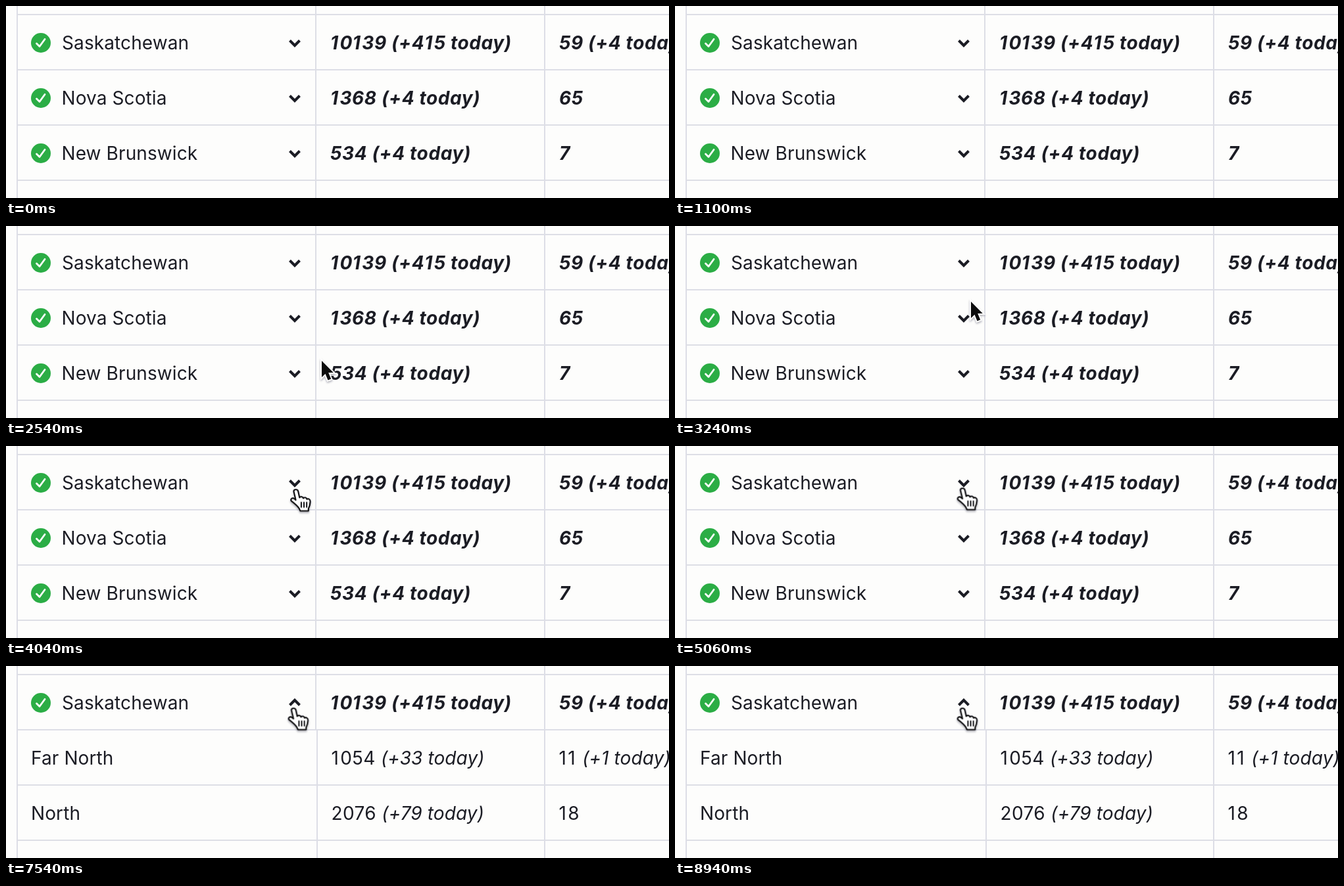
An HTML page that plays this animation: 1008 px wide and 292 px high, repeating every 9.88 s.

```html
<!DOCTYPE html>
<html lang="en">
<head>
<meta charset="utf-8">
<title>Expandable table rows</title>
<style>
  html, body { margin: 0; width: 100%; height: 100%; overflow: hidden; background: #fdfdfc; }
  svg { display: block; width: 1008px; height: 292px; }
  text { font: 400 28px Inter, "Liberation Sans", sans-serif; letter-spacing: .1px; fill: #1b1c24; }
  .total { font-weight: 700; font-style: italic; letter-spacing: .6px; }
  .count { letter-spacing: .4px; }
  .delta { font-style: italic; letter-spacing: .1px; }
  .one { letter-spacing: 2.3px; }
  .grid { fill: none; stroke: #dddee6; stroke-width: 2; }
  .chevron { fill: none; stroke: #1b1c24; stroke-width: 4.1; }

  .closed, .open, .arrow, .hand { animation: 9880ms step-end infinite; }
  .closed { animation-name: hide-closed; }
  .open { animation-name: show-open; }
  .arrow { animation-name: show-arrow; }
  .hand { animation-name: show-hand; }
  .pointer { animation: travel 9880ms linear infinite; }

  @keyframes hide-closed { 0% { opacity: 1; } 63.97%, 100% { opacity: 0; } }
  @keyframes show-open { 0% { opacity: 0; } 63.97%, 100% { opacity: 1; } }
  @keyframes show-arrow { 0% { opacity: 0; } 20.24% { opacity: 1; } 37.65%, 100% { opacity: 0; } }
  @keyframes show-hand { 0% { opacity: 0; } 37.65%, 100% { opacity: 1; } }
  @keyframes travel {
    0%, 20.24% { transform: translate(540px, 300px); }
    25.71%, 26.72% { transform: translate(480px, 205px); }
    31.17% { transform: translate(453px, 136px); }
    32.79%, 33.81% { transform: translate(450px, 115px); }
    37.65% { transform: translate(445px, 76px); }
    41.3% { transform: translate(440px, 67px); }
    47.98%, 100% { transform: translate(437px, 66px); }
  }
</style>
</head>
<body>
<svg viewBox="0 0 1008 292">
  <defs>
    <g id="check">
      <circle cx="53" cy="56" r="15" fill="#2bad45"/>
      <path d="M46.5 57 51 61.5 59 50.5" fill="none" stroke="#fff" stroke-width="2.8" stroke-linecap="round" stroke-linejoin="round"/>
    </g>
    <path id="down" class="chevron" d="M431.5 52.5 439 60 446.5 52.5"/>
    <filter id="shadow" x="-50%" y="-50%" width="200%" height="200%">
      <feDropShadow dx="0" dy="2" stdDeviation="1.5" flood-color="#222233" flood-opacity=".35"/>
    </filter>
  </defs>

  <path class="grid" d="M16 13H1008M16 97H1008M16 181H1008M16 265H1008M17 0V292M819 0V292M471 0V97"/>

  <use href="#check"/>
  <text x="85" y="66">Saskatchewan</text>
  <text class="total" x="493" y="66"><tspan class="one">1</tspan>0<tspan class="one">1</tspan>39 (+4<tspan class="one">1</tspan>5 today)</text>
  <text class="total" x="841" y="66">59 (+4 today)</text>

  <g class="closed">
    <path class="grid" d="M471 97V292"/>
    <use href="#down"/>
    <use href="#check" y="84"/>
    <use href="#down" y="84"/>
    <text x="84.5" y="150">Nova Scotia</text>
    <text class="total" x="493" y="150"><tspan class="one">1</tspan>368 (+4 today)</text>
    <text class="total" x="841" y="150">65</text>
    <use href="#check" y="168"/>
    <use href="#down" y="168"/>
    <text x="84.5" y="234">New Brunswick</text>
    <text class="total" x="493" y="234">534 (+4 today)</text>
    <text class="total" x="841" y="234">7</text>
  </g>

  <g class="open">
    <path class="grid" d="M473 97V292"/>
    <path class="chevron" d="M431.5 59.5 439 52 446.5 59.5"/>
    <text x="38" y="150">Far North</text>
    <text class="count" x="494.5" y="150"><tspan class="one">1</tspan>054 <tspan class="delta">(+33 today)</tspan></text>
    <text class="count" x="840.5" y="150"><tspan class="one">11</tspan> <tspan class="delta">(+1 today)</tspan></text>
    <text x="38" y="234">North</text>
    <text class="count" x="494.5" y="234">2076 <tspan class="delta">(+79 today)</tspan></text>
    <text class="count" x="840.5" y="234"><tspan class="one">1</tspan>8</text>
  </g>

  <g class="pointer">
    <g class="arrow">
      <path d="M0 0V25L5.5 19.7 9.5 29.5 14.2 27.5 10.2 18H17.8Z" fill="#08080c" stroke="#fff" stroke-width="3.6" paint-order="stroke" filter="url(#shadow)"/>
    </g>
    <g class="hand" transform="translate(0 -.5) scale(1.04)">
      <path d="M-3 1.5C-3-2 3-2 3.5 1.5L5.5 10.5C7 8.5 10.5 9 11 11.5C12.5 9.8 16 10.5 16.2 13C18 11.5 21.5 13 21.2 16.5C21 21 20 24 18.5 27V30H6.5L5 26.5C2 22-2 19-6.5 15.5C-8.5 13-5 10-2 12.5L0 14Z" fill="#fff" stroke="#08080c" stroke-width="2" stroke-linejoin="round" filter="url(#shadow)"/>
      <path d="M8 17.5V24.5M12 17.5V24.5M16 17.5V24.5" stroke="#08080c" stroke-width="1.8" stroke-linecap="round"/>
    </g>
  </g>
</svg>
</body>
</html>
```
